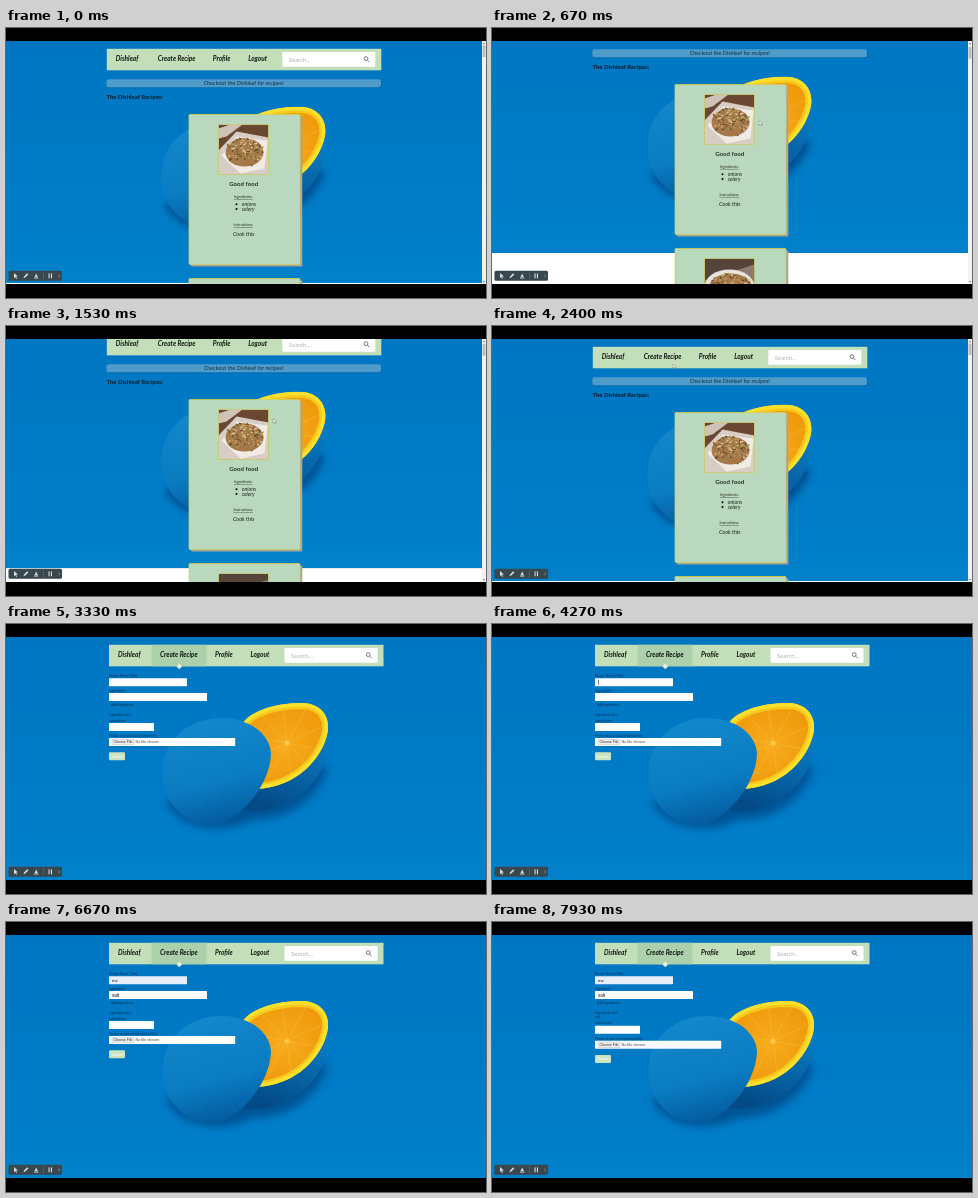
These frames come from a looping animation (480 by 270 pixels, 8 s). An HTML page:

```html
<!DOCTYPE html>
<html lang="en">
<head>
<meta charset="utf-8">
<title>Recipe site walkthrough</title>
<style>
  html, body { margin: 0; width: 100%; height: 100%; overflow: hidden; background: #000; }
  svg { display: block; width: 100%; height: 100%; font-family: Lato, sans-serif; }
  .hand { font-style: italic; }
  .form { font-family: "Liberation Sans", Arial, sans-serif; }
</style>
</head>
<body>
<svg id="stage" viewBox="0 0 480 270"></svg>
<script>
const LOOP = 8000;
const PAGE_SWAP = 2900;
const ITEM_ADDED = 7400;
const FACE = 'M236 100C246 86 270 79 297 79C318 80 325 96 321 111C315 135 291 163 251 165C236 160 226 120 236 100Z';
const FRONT = 'M157 153C154 121 178 96 212 94C243 93 264 110 265 129C265 152 246 186 215 200C191 206 159 188 157 153Z';

const rect = (x, y, w, h, fill, more = '') =>
  `<rect x="${x}" y="${y}" width="${w}" height="${h}" fill="${fill}" ${more}/>`;
const path = (d, fill, more = '') => `<path d="${d}" fill="${fill}" ${more}/>`;
const text = (x, y, size, str, more = '') =>
  `<text x="${x}" y="${y}" font-size="${size}" ${more}>${str}</text>`;

function random(seed) {
  return () => (seed = (seed * 16807) % 2147483647) / 2147483647;
}

const defs = `<defs>
  <clipPath id="view"><rect y="13" width="480" height="243"/></clipPath>
  <clipPath id="frame"><rect width="50" height="50"/></clipPath>
  <clipPath id="face"><path d="${FACE}"/></clipPath>
  <linearGradient id="sky" x1="0" y1="0" x2="0" y2="1">
    <stop offset="0" stop-color="#0076c1"/><stop offset=".5" stop-color="#007ac5"/>
    <stop offset="1" stop-color="#0280ca"/>
  </linearGradient>
  <linearGradient id="peel" x1=".35" y1="0" x2=".6" y2="1">
    <stop offset="0" stop-color="#1488cc"/><stop offset=".6" stop-color="#0a7cc2"/>
    <stop offset="1" stop-color="#04599c"/>
  </linearGradient>
  <linearGradient id="rind" x1=".9" y1=".1" x2=".4" y2="1">
    <stop offset="0" stop-color="#0a7cc3"/><stop offset="1" stop-color="#034a86"/>
  </linearGradient>
  <radialGradient id="flesh">
    <stop offset="0" stop-color="#f7ab1c"/><stop offset="1" stop-color="#ee9a0c"/>
  </radialGradient>
  <filter id="soft" x="-30%" y="-30%" width="160%" height="160%"><feGaussianBlur stdDeviation="4"/></filter>
</defs>`;

function photo() {
  const rnd = random(11);
  let spokes = '', dimples = '';
  for (let i = 0; i < 10; i++) {
    const a = (i + .3) * Math.PI / 5;
    spokes += `M281 119l${(40 * Math.cos(a)).toFixed(1)} ${(40 * Math.sin(a)).toFixed(1)}`;
  }
  for (let i = 0; i < 110; i++) {
    const a = rnd() * 6.283, r = Math.sqrt(rnd()) * 45;
    dimples += `M${(209 + r * Math.cos(a)).toFixed(1)} ${(146 + r * Math.sin(a)).toFixed(1)}h1`;
  }
  return rect(0, 13, 480, 243, 'url(#sky)') +
    path('M160 178C175 208 220 210 245 196C285 196 310 175 322 145L290 130L200 150Z', '#00437f',
      'opacity=".7" filter="url(#soft)"') +
    path('M322 104C324 134 314 160 287 175C266 187 245 190 230 184L250 120Z', 'url(#rind)') +
    `<g clip-path="url(#face)">
      ${path(FACE, 'url(#flesh)')}
      ${path(spokes, 'none', 'stroke="#fbbb3c" stroke-width=".8" opacity=".6"')}
      <circle cx="281" cy="119" r="2.5" fill="#fcc850"/>
      ${path(FACE, 'none', 'stroke="#f6c91c" stroke-width="12"')}
      ${path(FACE, 'none', 'stroke="#f8e02c" stroke-width="7"')}
    </g>` +
    path(FRONT, 'url(#peel)') +
    path(dimples, 'none', 'stroke="#2d9bdb" stroke-width=".7" opacity=".4"');
}

function nav(x, active) {
  const item = (dx, str) => text(x + dx, 33, 6.5, str, 'class="hand" font-weight="700" fill="#101510"');
  return rect(x, 20.8, 274.5, 21.5, '#c3dfb9') +
    rect(x + 42.5, 20.8, 55, 21.5, '#acd0ab', active ? '' : 'id="hover" opacity="0"') +
    (active ? path(`M${x + 70.3} 39.6l2.8 2.8l-2.8 2.8l-2.8 -2.8z`, '#e4efe2') : '') +
    item(9, 'Dishleaf') + item(51, 'Create Recipe') + item(106, 'Profile') + item(141.5, 'Logout') +
    rect(x + 175.5, 24, 93, 14.8, '#fff', 'rx="1"') +
    text(x + 182, 33.6, 6, 'Search...', 'fill="#b0b0b0"') +
    `<g fill="none" stroke="#777" stroke-width="1"><circle cx="${x + 259.2}" cy="30.6" r="1.9"/>
     <path d="M${x + 260.7} 32.2l2 2"/></g>`;
}

function dish(x, y, seed, plated) {
  const rnd = random(seed);
  const tones = ['#7a5632', '#b08450', '#cfa873', '#5b4126', '#97954a', '#e3c79c', '#a9763f'];
  const rx = plated ? 21 : 19, ry = plated ? 13 : 14;
  let food = '';
  for (let i = 0; i < 150; i++) {
    const a = rnd() * 6.283, r = Math.sqrt(rnd());
    const px = (26 + rx * r * Math.cos(a)).toFixed(1);
    const py = (28 + ry * r * Math.sin(a)).toFixed(1);
    food += `<path d="M${px} ${py}l${(rnd() * 5 - 2.5).toFixed(1)} ${(rnd() * 3 - 1.5).toFixed(1)}" stroke="${tones[i % 7]}"/>`;
  }
  const base = plated
    ? rect(0, 0, 50, 50, '#54443a') + path('M0 22L50 6V50H0Z', '#8c7b6c') +
      '<ellipse cx="25" cy="28" rx="25" ry="17" fill="#d9d6d0"/><ellipse cx="25" cy="27" rx="23.5" ry="15.5" fill="#e8e4de"/>'
    : rect(0, 0, 50, 50, '#6a4732') + path('M0 26L18 7L50 13V50H0Z', '#d8cdc4') +
      path('M3 31L18 12L49 16L46 44L22 49Z', '#f0ebe5') + path('M0 4L12 0H24L8 12L0 14Z', '#cfc2b6');
  return `<g transform="translate(${x} ${y})"><g clip-path="url(#frame)">${base}
    <ellipse cx="26" cy="28" rx="${rx}" ry="${ry}" fill="#a3784a"/>
    <g stroke-width="1.3" stroke-linecap="round">${food}</g></g>
    <rect width="50" height="50" fill="none" stroke="#e2d94f" stroke-width="1" stroke-dasharray="1 1"/></g>`;
}

function card(y, seed, plated) {
  const mid = 'text-anchor="middle"';
  const under = mid + ' text-decoration="underline" fill="#263026"';
  const hand = 'class="hand" fill="#1d261d"';
  return rect(185, y + 2.5, 111.3, 150, '#a8a596', 'rx="1"') +
    rect(183, y + .5, 111, 150, '#b9d8bd', 'stroke="#d3d25c" stroke-width="1" stroke-dasharray="1.4 .6" rx="1"') +
    dish(212.5, y + 10.5, seed, plated) +
    text(237.7, y + 72, 6.1, 'Good food', mid + ' font-weight="700" fill="#2a332a"') +
    text(237.3, y + 84, 3.6, 'Ingredients:', under) +
    `<circle cx="230.5" cy="${y + 90.2}" r="1"/><circle cx="230.5" cy="${y + 95}" r="1"/>` +
    text(235.7, y + 91.7, 5.3, 'onions', hand) + text(235.7, y + 96.7, 5.3, 'celery', hand) +
    text(237.3, y + 112, 3.6, 'Instructions:', under) +
    text(237.7, y + 121.7, 5.6, 'Cook this', mid + ' ' + hand);
}

function feed() {
  return `<g id="feed">${rect(0, 255, 480, 300, '#fff')}
    <g transform="translate(0 .1) scale(.9917 .9957)">${photo()}</g>
    ${nav(100.8, false)}
    ${rect(101, 52, 275, 8.3, '#00508c', 'rx="2.5" opacity=".35"')}
    ${rect(100.4, 51.2, 274.6, 8, '#4f9bca', 'rx="2.5"')}
    ${text(237.7, 57.2, 5.4, 'Checkout the Dishleaf for recipes!', 'text-anchor="middle" fill="#17303f"')}
    ${text(100.4, 70.8, 6, 'The Dishleaf Recipes:', 'font-weight="700" fill="#0b1c2b"')}
    ${card(86, 7, false)}${card(250, 23, true)}</g>
    ${rect(476, 13, 4, 243, '#f1f1f1')}
    ${rect(476.5, 17.5, 3, 11.5, '#bdbdbd', 'id="thumb"')}
    ${path('M476.8 16.2l1.2 -1.6l1.2 1.6zM476.8 253l1.2 1.6l1.2 -1.6z', '#777')}`;
}

function form() {
  const label = (x, y, str) => text(x, y, 3.2, str, 'fill="#0a2f52"');
  const input = (y, w, more) => rect(103, y, w, 8, '#fff', 'rx=".6" ' + (more || ''));
  return photo() + nav(103, true) + `<g class="form">
    ${label(103, 52.7, 'Recipe Name (Title):')}${input(54.2, 78, 'id="title"')}
    ${text(106, 59.7, 4.4, '', 'id="name" fill="#111"')}
    ${label(103, 67.8, 'Ingredients:')}${input(69, 98)}
    ${text(106, 74.5, 4.6, '', 'id="item" fill="#111"')}
    ${rect(0, 0, .6, 4.6, '#222', 'id="caret"')}
    ${label(105, 82.4, 'Add Ingredients')}
    ${label(103, 91.6, 'Ingredients List:')}
    <g id="added">${label(103, 96.4, 'salt')}</g>
    <g id="rest">
      ${label(103, 97.6, 'Instructions:')}${input(99, 45)}
      ${label(103, 112.8, 'Photos of your meal (optional file)')}${input(113.9, 126.2)}
      ${rect(106, 115.2, 21.8, 5.6, '#efefef', 'stroke="#aaa" stroke-width=".4" rx=".6"')}
      ${text(107.4, 119.3, 3.6, 'Choose File', 'fill="#222"')}
      ${text(129.4, 119.3, 3.8, 'No file chosen', 'fill="#444"')}
      ${rect(103, 128.3, 16, 8, '#cbe3c0', 'rx="1"')}
      ${text(111, 133.6, 3.6, 'Submit', 'text-anchor="middle" fill="#fff"')}
    </g></g>`;
}

function toolbar() {
  const ink = '#d8dcde';
  return rect(2.5, 242.8, 53.5, 10, '#39474f', 'rx="1.5"') +
    path('M8 245l4 3.4l-2 .2l1 2l-.8 .4l-1 -2l-1.2 1.2z', ink) +
    path('M17.5 250.2l.5 -1.8l3.2 -3.2l1.2 1.2l-3.2 3.2z', ink) +
    path('M28.6 249l1.6 -3.5l1.6 3.5zM28 249.6h4.4v1h-4.4z', ink) +
    rect(37, 244.5, .6, 6.6, '#66727a') +
    rect(42.5, 245.4, 1.1, 4.9, ink) + rect(44.9, 245.4, 1.1, 4.9, ink) +
    path('M52.6 246.5l1.3 1.4l-1.3 1.4', 'none', 'stroke="#9aa4aa" stroke-width=".7"');
}

document.getElementById('stage').innerHTML = defs + rect(0, 0, 480, 270, '#000') +
  `<g clip-path="url(#view)"><g id="home">${feed()}</g><g id="create">${form()}</g>
   <path id="mouse" d="M0 0l0 4.2l1.1 -1l.8 1.7l.8 -.4l-.8 -1.6h1.5z" fill="#fff" stroke="#333" stroke-width=".3"/>
   </g>` + toolbar();

const el = {};
document.querySelectorAll('[id]').forEach(n => el[n.id] = n);

const scrollKeys = [[0, 0], [70, 0], [670, 30], [1070, 51], [1200, 51], [1530, 13], [1750, 0]];

function track(keys, t) {
  for (let i = 1; i < keys.length; i++) {
    const [t0, v0] = keys[i - 1], [t1, v1] = keys[i];
    if (t < t1) return v0 + (v1 - v0) * (t - t0) / (t1 - t0);
  }
  return keys[keys.length - 1][1];
}

const ease = p => { p = Math.max(0, Math.min(1, p)); return p * p * (3 - 2 * p); };
const show = (node, on) => node.setAttribute('display', on ? 'inline' : 'none');
const move = (node, x, y) => node.setAttribute('transform', `translate(${x} ${y})`);
const typed = (str, t, start, step) =>
  str.slice(0, Math.max(0, Math.floor((t - start) / step) + 1));

function render(t) {
  const home = t < PAGE_SWAP;
  show(el.home, home);
  show(el.create, !home);
  show(el.mouse, home && t >= 70);

  if (home) {
    const y = track(scrollKeys, t);
    move(el.feed, 0, -y);
    move(el.thumb, 0, y * .05);
    const p = ease((t - 1800) / 750);
    move(el.mouse, 267 - 96 * p, 93 - 61 * p);
    el.hover.setAttribute('opacity', ease((t - 2430) / 120));
    return;
  }

  el.name.textContent = typed('mc', t, 4500, 230);
  el.item.textContent = typed('salt', t, 5700, 260);
  const onItem = t >= 5050;
  el.title.setAttribute('fill', onItem ? '#e6eefa' : '#fff');
  const field = onItem ? el.item : el.name;
  const width = field.textContent ? field.getComputedTextLength() : 0;
  move(el.caret, 106 + width, onItem ? 70.8 : 56);
  show(el.caret, t >= 4000 && t < ITEM_ADDED && (t - 5050 + 4000) % 1000 < 500);

  const added = t >= ITEM_ADDED;
  show(el.added, added);
  move(el.rest, 0, added ? 4.8 : 0);
}

function tick(now) {
  render(now % LOOP);
  requestAnimationFrame(tick);
}
render(0);
requestAnimationFrame(tick);
</script>
</body>
</html>
```
